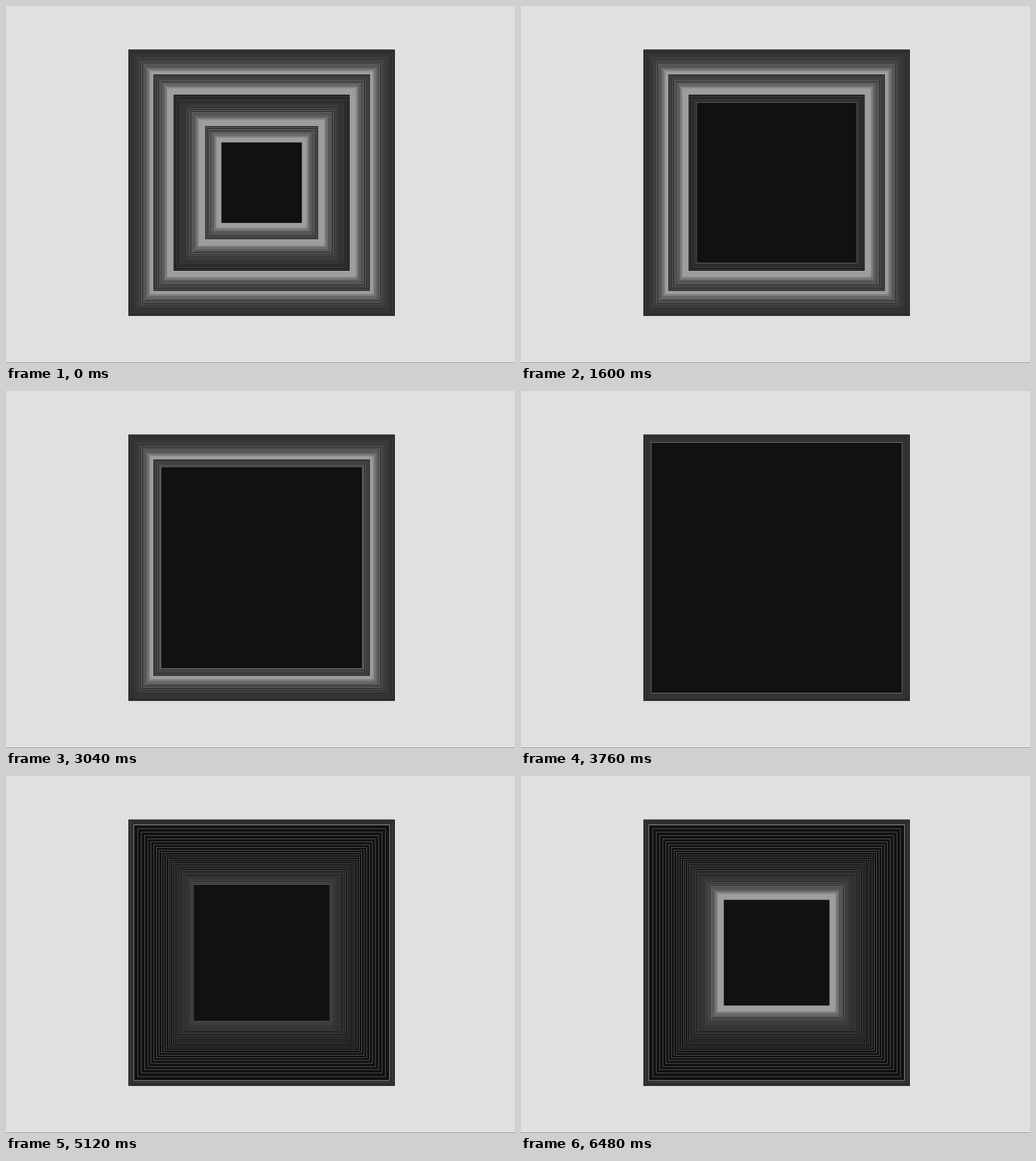
An HTML page without scripts for the animation above (6.72 s loop, 894 by 627 pixels).

```html
<!DOCTYPE html>
<html lang="en">
<head>
<meta charset="utf-8">
<title>Nested squares</title>
<style>
  @property --t {
    syntax: "<number>";
    inherits: true;
    initial-value: 0;
  }

  html, body {
    margin: 0;
    width: 100%;
    height: 100%;
    overflow: hidden;
    background: #e0e0e0;
  }

  svg {
    position: absolute;
    left: 0;
    top: 0;
    width: 894px;
    height: 627px;
  }

  /* --t counts steps of 80 ms */
  .live { animation: clock 6720ms steps(84) infinite; }
  .still { will-change: transform; }
  .late { animation: appear 6720ms step-end infinite; }

  @keyframes clock {
    from { --t: 0; }
    to { --t: 84; }
  }
  @keyframes appear {
    0% { opacity: 0; }
    70.2% { opacity: 1; }
  }

  /* Square number --n of a run easing from half size --a to --b */
  .sq {
    --n: calc(var(--n1, 0) + var(--n2, 0) + var(--n4, 0) + var(--n8, 0)
      + var(--n16, 0) + var(--n32, 0) + var(--n64, 0));
    --h: calc(var(--b) + (var(--a) - var(--b)) * pow(.95, var(--n)) - var(--pad, 0));
    x: calc((449 - var(--h)) * 1px);
    y: calc((310.3 - var(--h)) * 1px);
    width: calc(var(--h) * 2px);
    height: calc(var(--h) * 2px);
    opacity: clamp(0, var(--now, 999) - var(--n) + 1, 1);
    mix-blend-mode: var(--mix, normal);
    stroke-width: .5px;
  }

  /* Lines add up to full cover, then are dimmed together */
  .base { fill: #111; }
  .lines {
    --mix: plus-lighter;
    fill: none;
    stroke: #fff;
    opacity: .588;
  }

  /* Moving squares start at step --s */
  .shrink, .grow {
    fill: #111;
    opacity: clamp(0, var(--t) - var(--s), 1);
  }
  .shrink {
    --n1: calc(5 * (var(--t) - var(--s)) + var(--lead));
    --now: 999;
    --pad: .25;
  }
  .grow {
    --now: calc(5.2 * (var(--t) - var(--s)) + var(--lead));
    stroke: #9d9d9d;
  }
</style>
</head>
<body>
<svg class="still">
  <defs>
    <!-- each level doubles the number of squares -->
    <rect id="q1" class="sq"/>
    <g id="q2"><use href="#q1"/><use href="#q1" style="--n1:1"/></g>
    <g id="q4"><use href="#q2"/><use href="#q2" style="--n2:2"/></g>
    <g id="q8"><use href="#q4"/><use href="#q4" style="--n4:4"/></g>
    <g id="q16"><use href="#q8"/><use href="#q8" style="--n8:8"/></g>
    <g id="q32"><use href="#q16"/><use href="#q16" style="--n16:16"/></g>
    <g id="q64"><use href="#q32"/><use href="#q32" style="--n32:32"/></g>
    <g id="q128"><use href="#q64"/><use href="#q64" style="--n64:64"/></g>
  </defs>

  <rect y="626" width="894" height="1" fill="#8e8e8e"/>

  <g style="--a:234.1; --b:185">
    <use class="base" href="#q1"/><use class="lines" href="#q128"/>
  </g>
  <g style="--a:190.4; --b:154.9">
    <use class="base" href="#q1"/><use class="lines" href="#q128"/>
  </g>
  <g style="--a:154.9; --b:99.6">
    <use class="base" href="#q1"/><use class="lines" href="#q128"/>
  </g>
  <g style="--a:99.6; --b:68.5">
    <use class="base" href="#q1"/><use class="lines" href="#q128"/>
  </g>
</svg>

<svg class="live">
  <use class="shrink" href="#q1" style="--a:99.6; --b:68.5; --s:-10; --lead:0"/>
  <use class="grow" href="#q128" style="--a:68.5; --b:152.8; --s:13; --lead:1.6"/>
  <use class="grow" href="#q128" style="--a:152.8; --b:224.3; --s:36; --lead:-2.4"/>
</svg>

<svg class="still late">
  <g style="--a:224.3; --b:92.7">
    <use class="base" href="#q1"/><use class="lines" href="#q128"/>
  </g>
</svg>

<svg class="live">
  <use class="shrink" href="#q1" style="--a:224.3; --b:92.7; --s:58; --lead:1"/>
</svg>
</body>
</html>
```
